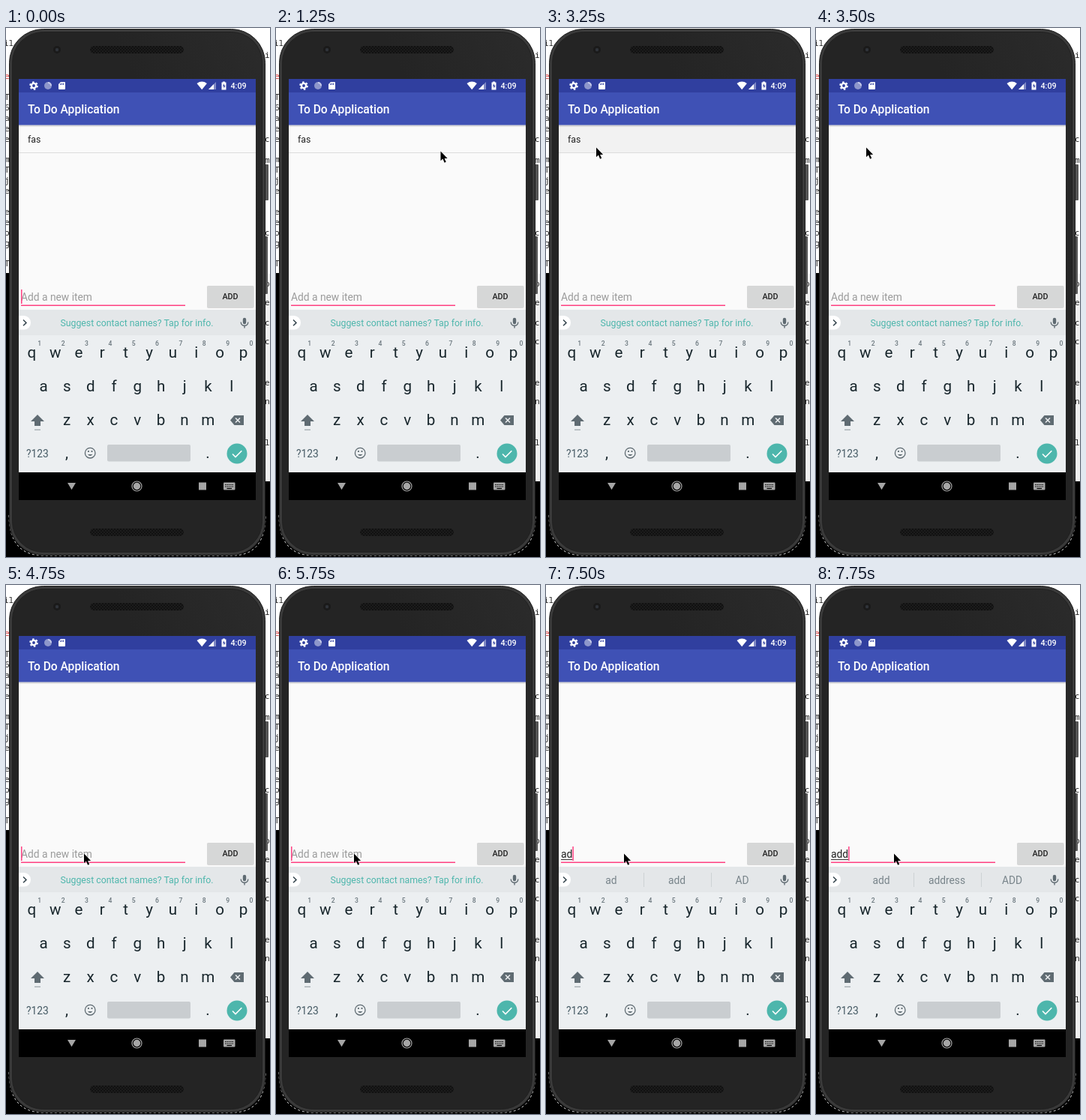
Recreate the animation shown at these times as an HTML page. Size 352 px wide and 706 px high, loop 8000 ms.

```html
<!DOCTYPE html>
<html lang="en">
<head>
<meta charset="utf-8">
<title>To Do Application</title>
<style>
  html, body { margin: 0; width: 100%; height: 100%; overflow: hidden; background: #fff; }
  svg { display: block; width: 352px; height: 706px; font-family: Roboto, sans-serif; }
  .mid { text-anchor: middle; }
  .code { font: 11px "Noto Sans Mono", monospace; }
</style>
</head>
<body>
<svg id="stage" viewBox="0 0 352 706">
  <defs>
    <linearGradient id="shade" x2="0" y2="1">
      <stop stop-color="#000" stop-opacity=".22"/>
      <stop offset="1" stop-color="#000" stop-opacity="0"/>
    </linearGradient>
    <linearGradient id="face" x1="1" y1="0" x2=".7" y2=".3">
      <stop stop-color="#2b2b2b"/>
      <stop offset="1" stop-color="#242424"/>
    </linearGradient>
    <pattern id="mesh" width="4" height="4" patternUnits="userSpaceOnUse">
      <rect width="4" height="4" fill="#1c1c1c"/>
      <path d="M0 0h2v2h-2zM2 2h2v2h-2z" fill="#111"/>
    </pattern>
    <clipPath id="screen"><rect x="17" y="68" width="316" height="562"/></clipPath>
  </defs>

  <!-- desktop behind the phone -->
  <rect width="352" height="706" fill="#fff"/>
  <rect y="327" width="40" height="379"/>
  <rect x="320" y="328" width="32" height="277" fill="#f0f0f0"/>
  <rect x="40" y="605" width="312" height="101"/>
  <g id="desktop" class="code" fill="#222"></g>

  <!-- phone body -->
  <rect x="345" y="182" width="5" height="48" rx="1" fill="#555"/>
  <rect x="345" y="278" width="4" height="77" rx="1" fill="#555"/>
  <path d="M4 650q0 54 46 54h252q44 0 44-54" fill="none" stroke="#ddd" stroke-dasharray="3 3"/>
  <rect x="4.5" y="1.5" width="341" height="702" rx="45" fill="#3a3a3a" stroke="#1b1b1b"/>
  <rect x="8.5" y="5.5" width="333" height="694" rx="41" fill="url(#face)" stroke="#202020"/>
  <rect x="112" y="24" width="125" height="10" rx="5" fill="url(#mesh)"/>
  <rect x="112" y="668" width="125" height="10" rx="5" fill="url(#mesh)"/>
  <circle cx="68" cy="29" r="5" fill="#1a1a1a"/>
  <circle cx="68" cy="29" r="2.2" fill="#30343a"/>

  <g clip-path="url(#screen)">
    <rect x="17" y="68" width="316" height="562" fill="#fafafa"/>

    <!-- to-do list -->
    <g id="item">
      <rect id="press" x="17" y="130" width="316" height="36" fill="#f2f2f2"/>
      <text x="29" y="152.5" font-size="12.3" fill="#212121">fas</text>
      <rect x="17" y="166" width="316" height="1" fill="#dcdcdc"/>
    </g>

    <!-- app bar and status bar -->
    <rect x="17" y="129.5" width="316" height="3" fill="url(#shade)"/>
    <rect x="17" y="68" width="316" height="18" fill="#303f9f"/>
    <rect x="17" y="86" width="316" height="43.5" fill="#3f51b5"/>
    <text x="29" y="114" font-size="15.6" font-weight="500" fill="#fff">To Do Application</text>
    <g fill="#fff">
      <circle cx="37" cy="77" r="3.1" fill="none" stroke="#fff" stroke-width="2.4"/>
      <circle cx="37" cy="77" r="4.9" fill="none" stroke="#fff" stroke-width="1.8" stroke-dasharray="2.5 2.63"/>
      <circle cx="56" cy="77" r="5" fill="#8e97cb"/>
      <path d="M56 72a5 5 0 0 1 5 5h-2a3 3 0 0 0-3-3z" fill="#c5cae9"/>
      <path d="M73 72h5a1 1 0 0 1 1 1v8a1 1 0 0 1-1 1h-7a1 1 0 0 1-1-1v-6z"/>
      <path d="M72.5 74v2M74.5 73.5v2.5M76.5 73.5v2.5" stroke="#303f9f"/>
      <path d="M254.5 74q6.7-4.8 13.4 0l-6.7 8.2z"/>
      <path d="M280 72v10h-10z" opacity=".4"/>
      <path d="M277 75v7h-7z"/>
      <path d="M289 71.5h3v1h1.5v10h-6v-10h1.5z"/>
      <path d="M291 74l-2 3.7h1.5v3l2-3.9h-1.5z" fill="#303f9f"/>
      <text x="299.5" y="81" font-size="10.75" font-weight="500">4:09</text>
    </g>

    <!-- entry row -->
    <text id="hint" x="20" y="364" font-size="13.8" fill="#9b9b9b">Add a new item</text>
    <text id="typed" x="20" y="364" font-size="13.8" fill="#212121"></text>
    <rect id="typedLine" x="20" y="366" height="1" fill="#333"/>
    <rect x="20" y="369.5" width="219" height="1.5" fill="#ff4081"/>
    <rect id="caret" y="349" width="1.5" height="19" fill="#ff4081"/>
    <rect x="268" y="345" width="62.5" height="29" rx="2" fill="#000" opacity=".14"/>
    <rect x="268" y="344" width="62.5" height="29" rx="1.5" fill="#d6d7d7"/>
    <text x="299" y="362" class="mid" font-size="10.75" font-weight="500" fill="#212121">ADD</text>

    <!-- keyboard -->
    <rect x="17" y="376" width="316" height="34" fill="#e4e7e9"/>
    <rect x="17" y="410" width="316" height="183" fill="#eceff1"/>
    <path d="M17 384h7a9 9.3 0 0 1 0 18.6h-7z" fill="#fff"/>
    <path d="M23 389.5l4 3.9-4 3.9" fill="none" stroke="#37474f" stroke-width="1.5"/>
    <text id="tip" x="174.5" y="398" class="mid" font-size="12.3" fill="#4db6ac">Suggest contact names? Tap for info.</text>
    <g id="suggestions" class="mid" font-size="13.8" fill="#78848a">
      <path d="M130.5 384v19M220.5 384v19" stroke="#cdd2d5"/>
    </g>
    <g fill="none" stroke="#5f6b72" stroke-width="1.4">
      <rect x="316.5" y="387.5" width="3" height="7" rx="1.5" fill="#5f6b72"/>
      <path d="M313.2 392.5a4.8 4.8 0 0 0 9.6 0M318 397.5v3"/>
    </g>
    <g id="keys" class="mid"></g>
    <path d="M42 516l9 9h-5v6h-8v-6h-5z" fill="#5f6b72"/>
    <rect x="38" y="535.5" width="8" height="1.5" fill="#aab2b6"/>
    <path d="M304.5 517h12.5v13h-12.5l-5.5-6.5z" fill="#5f6b72"/>
    <path d="M306 520.5l6 6M312 520.5l-6 6" stroke="#eceff1" stroke-width="1.5"/>
    <g fill="none" stroke="#5f6b72" stroke-width="1.3">
      <circle cx="112.2" cy="567.2" r="6.8"/>
      <path d="M109 569q3.2 4 6.4 0z" fill="#5f6b72" stroke="none"/>
      <path d="M109.9 564v2M114.5 564v2" stroke-width="1.8"/>
    </g>
    <rect x="135" y="556" width="111" height="22.5" rx="2" fill="#c9cdd0"/>
    <circle cx="308" cy="568" r="13.5" fill="#4db6ac"/>
    <path d="M302 568.5l4 4 8.3-8.3" fill="none" stroke="#fff" stroke-width="1.6"/>

    <!-- navigation bar -->
    <rect x="17" y="593" width="316" height="37"/>
    <g fill="#a6a6a6">
      <path d="M82 607h11l-5.5 9.3z"/>
      <circle cx="174.5" cy="611.5" r="6.5" fill="none" stroke="#a6a6a6" stroke-width="1.2"/>
      <circle cx="174.5" cy="611.5" r="4.7"/>
      <rect x="257" y="606.5" width="10" height="10"/>
      <rect x="290" y="606.5" width="15.5" height="10" rx="1"/>
      <path d="M292 609.5h12M292 612h12" stroke="#000" stroke-width="1.2" stroke-dasharray="1.4 1"/>
      <path d="M294.5 614.5h6.5" stroke="#000" stroke-width="1.2"/>
    </g>
  </g>

  <path id="pointer" d="M0 0v12.8l2.9-2.7 2.2 5.1 2.1-.9-2.100-4.900h4z" stroke="#fff" paint-order="stroke"/>
</svg>

<script>
  const LOOP = 8000;
  const $ = id => document.getElementById(id);

  function addText(parent, text, x, y, attrs = {}) {
    const node = document.createElementNS("http://www.w3.org/2000/svg", "text");
    node.textContent = text;
    Object.entries({ x, y, ...attrs }).forEach(([key, value]) => node.setAttribute(key, value));
    return parent.appendChild(node);
  }

  // Edges of the text windows that peek out beside the phone.
  addText($("desktop"), "il", -3, 24);
  [..."T6aee mTje eeog T"].forEach((c, i) => addText($("desktop"), c, -2, 96 + 13.9 * i));
  addText($("desktop"), "e", -2, 68, { fill: "#d33" });
  [["ie", 40], ["c", 152], ["m", 180], ["c", 277], ["p", 345], ["e", 370], ["c", 397],
   ["c", 422], ["e", 477], ["n", 502], ["ll", 557]]
    .forEach(([text, y]) => addText($("desktop"), text, 345, y));

  const PITCH = 31.35;
  function keyRow(letters, x, y, attrs = {}) {
    [...letters].forEach((c, i) =>
      addText($("keys"), c, x + PITCH * i, y, { "font-size": 20.6, fill: "#18262c", ...attrs }));
  }
  keyRow("qwertyuiop", 34.3, 440);
  keyRow("1234567890", 44.8, 424, { "font-size": 8.6, "font-weight": 500, fill: "#6a767d" });
  keyRow("asdfghjkl", 50, 485);
  keyRow("zxcvbnm", 81.2, 530);
  keyRow(",", 81, 574);
  keyRow(".", 269, 574);
  keyRow(["?123"], 42, 572.5, { "font-size": 13.8, fill: "#455a64" });

  const choices = [87, 174.5, 261.5].map(x => addText($("suggestions"), "", x, 398.5));

  const pointerStops = [[750, 234.5, 164.5], [1000, 219.5, 164.5], [2500, 67, 143.5],
    [2750, 67, 159.5], [4000, 94.5, 349.5], [4250, 104, 358.5]];
  const typing = [
    [7500, "ad", ["ad", "add", "AD"]],
    [7750, "add", ["add", "address", "ADD"]]
  ];
  const latest = (steps, t) => steps.filter(step => step[0] <= t).pop();
  const show = (id, on) => $(id).setAttribute("visibility", on ? "visible" : "hidden");

  function draw(t) {
    const stop = latest(pointerStops, t);
    show("pointer", stop);
    if (stop) $("pointer").setAttribute("transform", `translate(${stop[1]} ${stop[2]})`);

    show("item", t < 3500);
    show("press", t >= 3000 && t < 3500);

    const entry = latest(typing, t);
    show("hint", !entry);
    show("tip", !entry);
    show("suggestions", entry);
    $("typed").textContent = entry ? entry[1] : "";
    choices.forEach((node, i) => node.textContent = entry ? entry[2][i] : "");

    const width = entry ? $("typed").getComputedTextLength() : 0;
    $("typedLine").setAttribute("width", width);
    $("caret").setAttribute("x", 20 + width);
    show("caret", entry || (t + 250) % 1000 < 500);
  }

  const start = performance.now();
  function tick() {
    draw((performance.now() - start) % LOOP);
    requestAnimationFrame(tick);
  }
  draw(0);
  tick();
</script>
</body>
</html>
```
